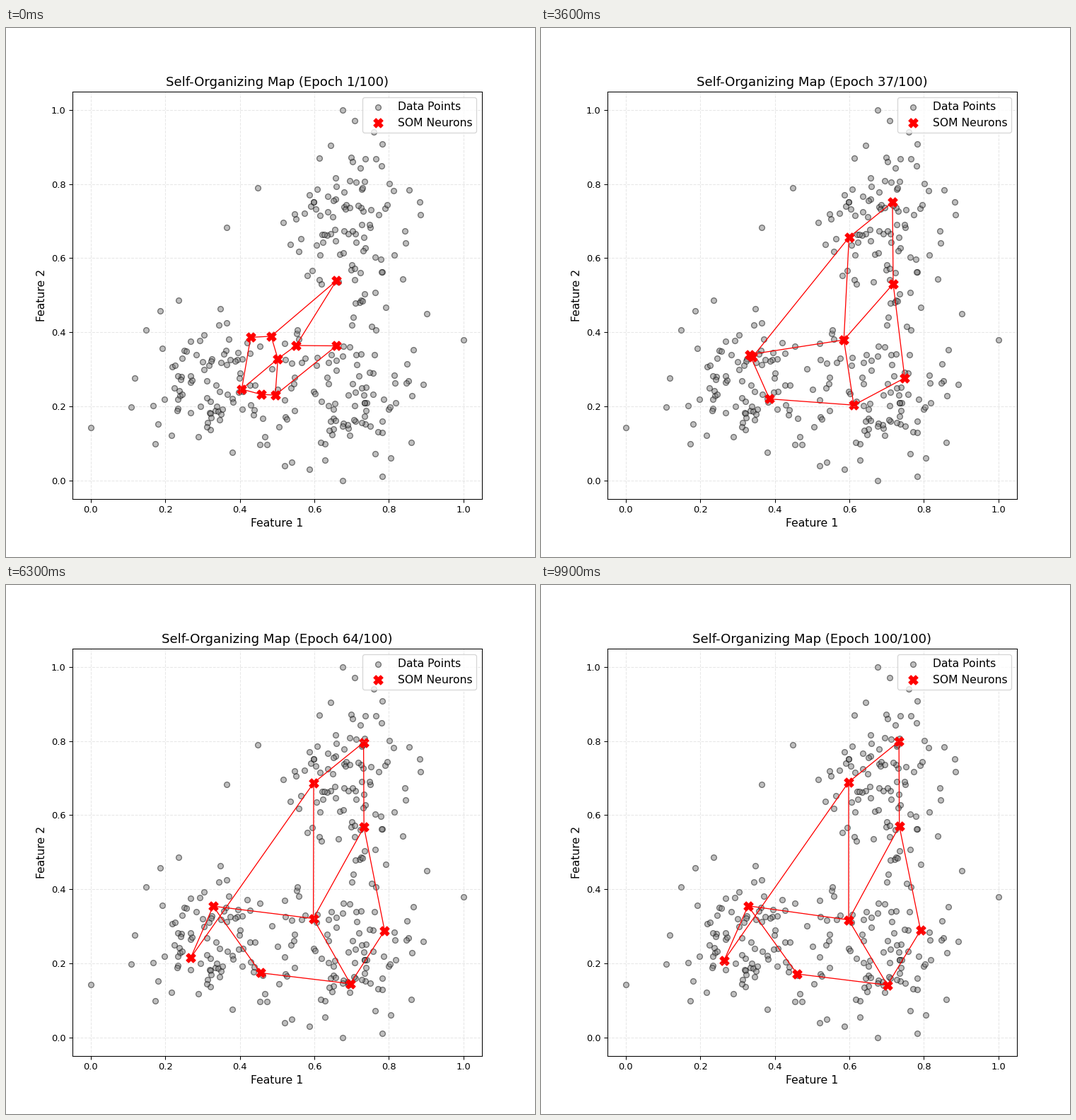
A matplotlib script that plays this animation: 748 by 748 pixels, repeating every 10000 ms.

```python
import numpy as np
import matplotlib.pyplot as plt
from matplotlib.animation import FuncAnimation

EPOCHS = 100
ORDERED = 28  # epoch at which the grid has untangled
plt.rcParams["font.family"] = "DejaVu Sans"

# Three Gaussian clusters, min-max scaled per axis
np.random.seed(42)
data = np.vstack([np.random.randn(100, 2) * 0.1 + center
                  for center in ([0.7, 0.7], [0.3, 0.3], [0.7, 0.3])])
data = (data - data.min(axis=0)) / (data.max(axis=0) - data.min(axis=0))

# 3 x 3 neuron grid: tangled, ordered, fitted to the data
tangled = np.array([
    [(.429, .386), (.484, .389), (.659, .539)],
    [(.405, .246), (.502, .328), (.551, .364)],
    [(.457, .232), (.495, .230), (.659, .363)]])
ordered = np.array([
    [(.412, .451), (.600, .625), (.699, .705)],
    [(.337, .325), (.573, .438), (.702, .493)],
    [(.315, .266), (.526, .262), (.708, .264)]])
fitted = np.array([
    [(.264, .208), (.598, .689), (.733, .799)],
    [(.328, .355), (.598, .317), (.734, .570)],
    [(.460, .171), (.702, .141), (.791, .289)]])


def settle(a, b, u, power):
    """Move from a to b, slowing down towards b."""
    return b + (a - b) * (1 - u) ** power


def weights(epoch):
    if epoch < ORDERED:
        return settle(tangled, ordered, (epoch - 1) / (ORDERED - 1), 3)
    return settle(ordered, fitted, (epoch - ORDERED) / (EPOCHS - ORDERED), 5)


fig, ax = plt.subplots(figsize=(8, 8), dpi=93.5)
ax.scatter(*data.T, c="gray", alpha=0.5, edgecolors="k", label="Data Points")
neurons = ax.scatter(*tangled.reshape(-1, 2).T, c="red", marker="X", s=100,
                     label="SOM Neurons")
links = [ax.plot([], [], "r-", lw=1)[0] for _ in range(6)]

ax.set(xlim=(-0.05, 1.05), ylim=(-0.05, 1.05))
ax.set_xlabel("Feature 1", fontsize=12)
ax.set_ylabel("Feature 2", fontsize=12)
ax.grid(True, linestyle="--", alpha=0.3)
ax.legend(loc="upper right", fontsize=12)
title = ax.set_title("", fontsize=14)


def update(i):
    w = weights(i + 1)
    neurons.set_offsets(w.reshape(-1, 2))
    for link, path in zip(links, [*w, *w.swapaxes(0, 1)]):
        link.set_data(*path.T)
    title.set_text(f"Self-Organizing Map (Epoch {i + 1}/{EPOCHS})")
    return [neurons, title, *links]


anim = FuncAnimation(fig, update, frames=EPOCHS, interval=100,
                     repeat=True, repeat_delay=0, blit=False)
plt.show()
```
